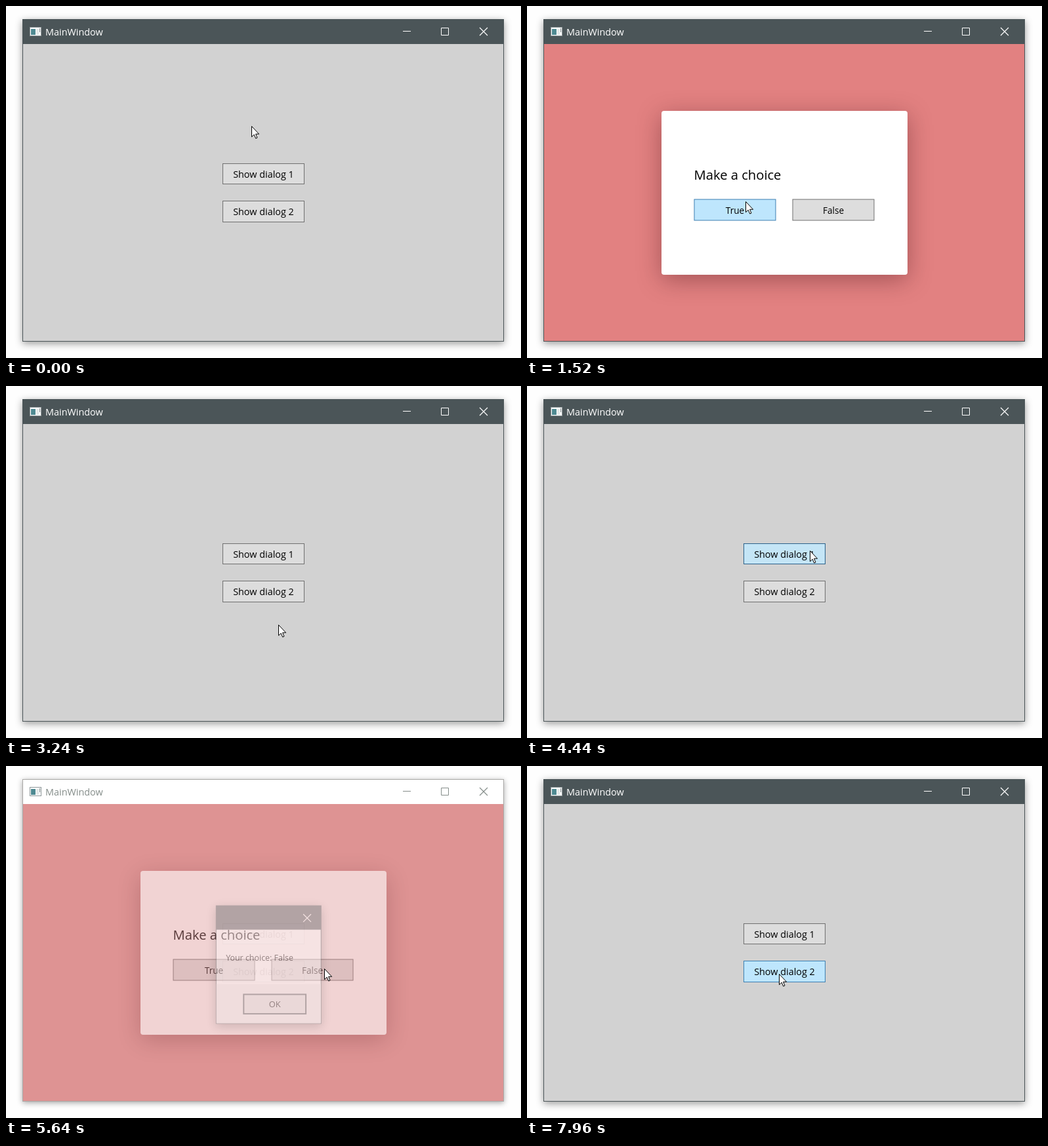
These frames come from a looping animation (785 by 537 pixels, 8 s). An HTML page:

```html
<!DOCTYPE html>
<html lang="en">
<head>
<meta charset="utf-8">
<title>Dialog demo</title>
<style>
  html, body { margin: 0; width: 100%; height: 100%; overflow: hidden; background: #fefefe; }
  svg { display: block; font: 14.4px "Open Sans", "Noto Sans", sans-serif; }
  text { white-space: pre; }
  .mid { text-anchor: middle; }
  .icon { fill: none; stroke: currentColor; }
  .button rect { fill: #ddd; stroke: #707070; }
  .button.hover rect { fill: #bee6fd; stroke: #3c7fb1; }
  .button.pressed rect { fill: #c4e5f6; stroke: #2c628b; }
  .ok rect { fill: #e1e1e1; stroke: #4b5558; stroke-width: 2; }
  .ok.hover rect { fill: #e6eaeb; }
  #frame { filter: drop-shadow(0 3px 6px rgba(0, 0, 0, .4)); fill: #4b5558; }
  #caption { color: #fff; }
  .inactive #frame { filter: drop-shadow(0 2px 4px rgba(0, 0, 0, .35)); fill: #a9a8a6; }
  .inactive #titlebar { fill: #fff; }
  .inactive #caption { color: #858d8a; }
  #titlebar { fill: #4b5558; }
  #panel { filter: drop-shadow(0 8px 18px rgba(50, 0, 10, .35)); }
  .message > .back { filter: drop-shadow(0 4px 8px rgba(0, 0, 0, .4)); }
</style>
</head>
<body>
<svg id="stage" width="785" height="537" viewBox="0 0 785 537"></svg>
<script>
const LOOP = 8000;
const stage = document.getElementById('stage');

const rect = (x, y, w, h, attrs = '') =>
  `<rect x="${x}" y="${y}" width="${w}" height="${h}" ${attrs}/>`;
const text = (x, y, label, attrs = '') => `<text x="${x}" y="${y}" ${attrs}>${label}</text>`;
const button = (id, x, y, w, h, label, size = 14.4) =>
  `<g id="${id}" class="button">${rect(x + .5, y + .5, w - 1, h - 1)}` +
  text(x + w / 2, y + h / 2 + 5.5, label, `class="mid" font-size="${size}"`) + '</g>';
const cross = (x, y) =>
  `<path class="icon" stroke-width="1.2" d="M${x - 6} ${y - 6}l12 12m0-12l-12 12"/>`;

// Message boxes are laid out around their own centre.
const message = (id, answer, half) => `<g id="${id}" class="message">
  ${rect(-half, -91.5, half * 2, 183, 'class="back" fill="#4b5558"')}
  ${rect(1 - half, -54, half * 2 - 2, 144.5, 'fill="#fff"')}
  ${rect(1 - half, 30, half * 2 - 2, 60.5, 'fill="#f0f0f0"')}
  <g color="#fff">${cross(half - 22, -72)}</g>
  ${text(15.5 - half, -6.2, 'Your choice: ' + answer, 'font-size="12.6"')}
  <g class="ok">${rect(half - 120, 46, 96, 30)}
  ${text(half - 72, 65.5, 'OK', 'class="mid" font-size="13"')}</g></g>`;

stage.innerHTML = `
  <g id="window">
    ${rect(25, 20, 734, 492, 'id="frame"')}
    ${rect(26, 21, 732, 37, 'id="titlebar"')}
    ${rect(36.5, 32.5, 17, 13, 'fill="#fff" stroke="#8d9698"')}
    ${rect(38, 35, 7, 9, 'fill="#4f8a92"')}
    ${rect(46, 35, 4, 9, 'fill="#e3e8e8"')}
    ${rect(51, 34, 1, 6, 'fill="#7c8688"')}
    <g id="caption">
      ${text(60, 45, 'MainWindow', 'fill="currentColor"')}
      <path class="icon" d="M605 38.5h12M663.5 33.5h11v11h-11z"/>
      ${cross(728, 39)}
    </g>
    ${rect(26, 58, 732, 453, 'fill="#d2d2d2"')}
    ${button('show1', 330, 240, 125, 32, 'Show dialog 1')}
    ${button('show2', 330, 297, 125, 33, 'Show dialog 2')}
    ${rect(26, 58, 732, 453, 'id="veil" fill="#e28181"')}
    <g id="dialog">
      ${rect(205, 160, 375, 250, 'id="panel" rx="4" fill="#fff"')}
      ${text(254.5, 264.5, 'Make a choice', 'font-size="20.2"')}
      ${button('yes', 254.5, 294.5, 125, 33, 'True', 13.6)}
      ${button('no', 404.5, 294.5, 125, 33, 'False', 13.6)}
    </g>
  </g>
  ${message('saidYes', 'True', 80)}
  ${message('saidNo', 'False', 81.5)}
  <path id="cursor" fill="#fff" stroke="#000" stroke-linejoin="round"
    d="M.5.5v16.2l3.7-3.5 2.5 5.8 2.3-1-2.4-5.7h5z"/>`;

const $ = id => document.getElementById(id);
const clamp = v => Math.max(0, Math.min(1, v));

// When each dialog opens, is answered, and its message box is dismissed.
const rounds = [
  { press: 650, open: 770, answer: 1960, dismiss: 2960, box: $('saidYes') },
  { press: 4400, open: 4510, answer: 5560, dismiss: 6720, box: $('saidNo') },
];

// Pointer stops: time, x, y.
const path = [
  [0, 374, 183], [80, 374, 183], [160, 374, 197], [300, 374, 197], [560, 376, 250],
  [1280, 376, 250], [1600, 325, 307], [2640, 325, 307], [2920, 415, 364],
  [3460, 415, 364], [3640, 490, 428], [3820, 524, 330], [3980, 476, 228],
  [4160, 431, 251], [4880, 431, 251], [5200, 507, 307], [5240, 485, 309],
  [6000, 485, 309], [6360, 445, 369], [6480, 427, 372], [7430, 427, 372], [7960, 384, 317],
];

function pointerAt(t) {
  const next = path.findIndex(stop => stop[0] > t);
  if (next < 0) return path[path.length - 1].slice(1);
  const [t0, x0, y0] = path[next - 1], [t1, x1, y1] = path[next];
  const u = (t - t0) / (t1 - t0), e = u * u * (3 - 2 * u);
  return [x0 + (x1 - x0) * e, y0 + (y1 - y0) * e];
}

const inside = ([x, y], [left, top, w, h]) =>
  x >= left && x < left + w && y >= top && y < top + h;

function draw(t) {
  const pointer = pointerAt(t);
  let veil = 0, dialog = 0, blocked = false, pressed = false;

  for (const { press, open, answer, dismiss, box } of rounds) {
    const fade = Math.min(clamp((t - open) / 350), 1 - clamp((t - answer) / 170) ** 2);
    veil = Math.max(veil, fade);
    dialog = Math.max(dialog, t < answer ? fade : fade * fade);
    blocked ||= t >= answer && t < dismiss;
    pressed ||= t >= press && t < open;

    const shown = Math.min(clamp((t - answer) / 215), 1 - clamp((t - dismiss) / 175));
    const scale = .98 + .02 * shown;
    box.setAttribute('opacity', shown);
    box.setAttribute('transform', `translate(400.3 303) scale(${scale})`);
    box.querySelector('.ok').classList.toggle('hover', shown === 1 && inside(pointer, [360, 348, 98, 32]));
  }

  $('window').classList.toggle('inactive', blocked);
  $('veil').setAttribute('opacity', veil);
  $('dialog').setAttribute('opacity', dialog);

  const hover = (id, enabled, area) =>
    $(id).classList.toggle('hover', enabled && inside(pointer, area));
  const free = veil === 0 && !blocked;
  hover('show1', free, [330, 240, 125, 32]);
  hover('show2', free, [330, 297, 125, 33]);
  hover('yes', dialog === 1, [254, 294, 126, 33]);
  hover('no', dialog === 1, [404, 294, 126, 33]);
  $('show1').classList.toggle('pressed', pressed);

  $('cursor').setAttribute('transform', `translate(${pointer.map(Math.round)})`);
}

function tick() {
  draw(performance.now() % LOOP);
  requestAnimationFrame(tick);
}
tick();
</script>
</body>
</html>
```
